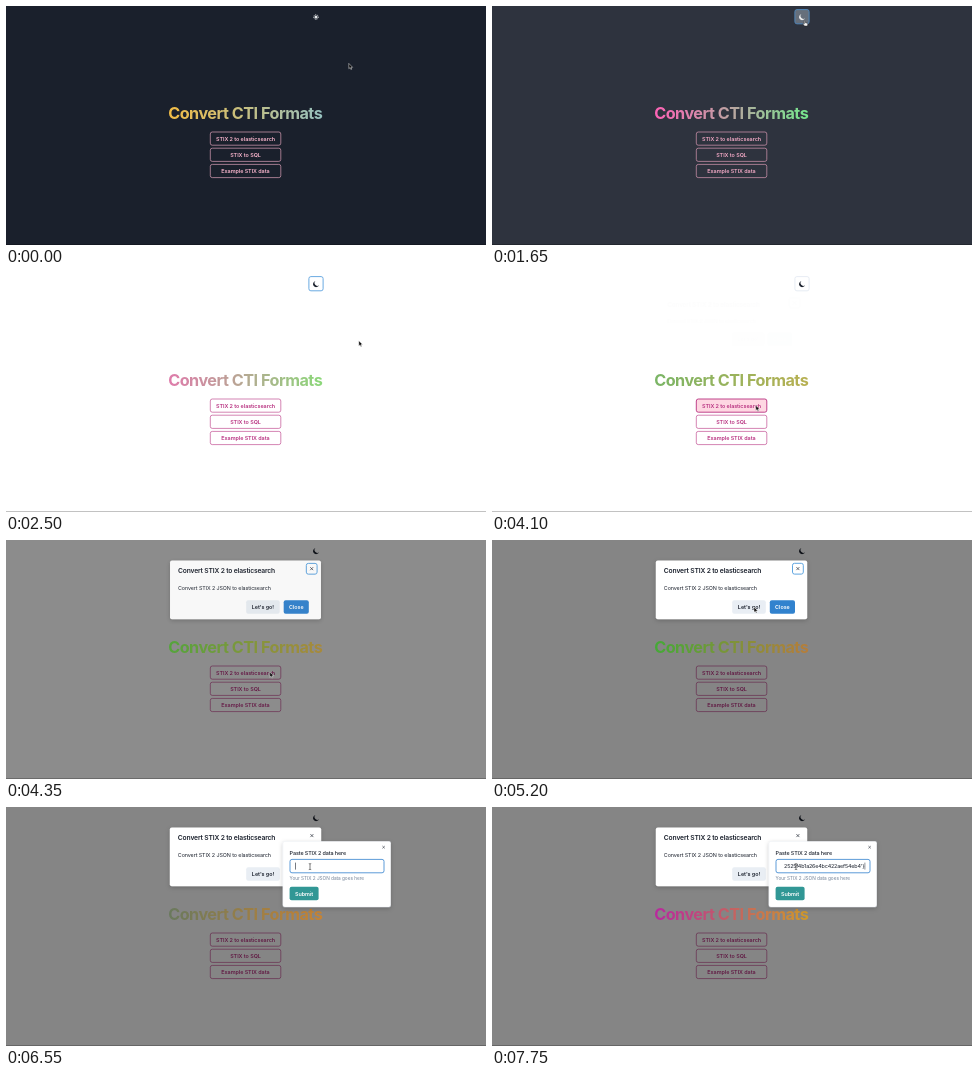
Recreate the animation shown at these times as an HTML page. Size 480 by 239 pixels, loop 8000 ms.

```html
<!DOCTYPE html>
<html lang="en">
<head>
<meta charset="utf-8">
<title>Convert CTI Formats</title>
<style>
  html, body { margin: 0; width: 100%; height: 100%; overflow: hidden; background: #1a202c; }
  svg { display: block; width: 100vw; height: 100vh; }
  text { font: 400 5.4px Inter, "Liberation Sans", sans-serif; letter-spacing: -.018em; white-space: pre; }
  .title { font-size: 16.2px; font-weight: 700; letter-spacing: -.03em; }
  .button { font-weight: 600; letter-spacing: -.006em; text-anchor: middle; }
  .heading { font-size: 6.75px; font-weight: 600; letter-spacing: -.025em; }
  .label { font-weight: 500; }
  .helper { font-size: 4.725px; letter-spacing: -.005em; }
  .data { text-anchor: end; letter-spacing: -.03em; }
</style>
</head>
<body>
<svg viewBox="0 0 480 239" preserveAspectRatio="none">
  <defs>
    <linearGradient id="titleFill" gradientUnits="userSpaceOnUse" x1="162" x2="317">
      <stop id="leftStop"/><stop id="rightStop" offset="1"/>
    </linearGradient>
    <filter id="shadow" x="-20%" y="-20%" width="140%" height="150%">
      <feDropShadow dx="0" dy="1.5" stdDeviation="2" flood-opacity=".2"/>
    </filter>
    <clipPath id="inputClip"><rect x="288.8" y="53" width="84.8" height="12"/></clipPath>
  </defs>

  <rect id="page" width="480" height="239"/>
  <rect y="238" width="480" height="1" fill="#000" opacity=".24"/>
  <rect id="toggle" x="302.9" y="3.6" width="14.2" height="14.2" rx="2"/>
  <g id="sun" fill="#e8eaed" stroke="#e8eaed">
    <circle cx="310" cy="11" r="1.5" stroke="none"/>
    <circle cx="310" cy="11" r="2.3" fill="none" stroke-width="1" stroke-dasharray=".9 .906"/>
  </g>
  <path id="moon" d="M309.6 8a3.1 3.1 0 1 0 3.4 4.2a2.7 2.7 0 0 1-3.4-4.2Z"/>
  <g id="menu"></g>
  <rect id="overlay" width="480" height="239"/>
  <text class="title" x="239.2" y="112.8" text-anchor="middle" fill="url(#titleFill)">Convert CTI Formats</text>

  <g id="modal">
    <rect x="163.8" y="20.4" width="151.4" height="58.9" rx="2" fill="#fff" filter="url(#shadow)"/>
    <g fill="#1a202c">
      <text class="heading" x="171.8" y="33.4">Convert STIX 2 to elasticsearch</text>
      <text x="171.8" y="50.1">Convert STIX 2 JSON to elasticsearch</text>
    </g>
    <rect id="closeRing" x="300.5" y="23.3" width="10.8" height="10.8" rx="2" fill="none" stroke="#5fa5e0"/>
    <path d="M304.4 27.1l3 3m0-3l-3 3" stroke="#1a202c" stroke-width=".65"/>
    <rect id="go" x="240.2" y="60.3" width="33.6" height="13.5" rx="2"/>
    <text class="button" x="257" y="69" fill="#1a202c">Let's go!</text>
    <rect id="closeButton" x="277.8" y="60.3" width="25.2" height="13.5" rx="2" fill="#3182ce"/>
    <text class="button" x="290.4" y="69" fill="#fff">Close</text>
  </g>

  <g id="popover">
    <rect x="276.8" y="34.3" width="108" height="65.8" rx="2" fill="#fff" stroke="#dde3ea" stroke-width=".35" filter="url(#shadow)"/>
    <rect id="popRing" x="373.5" y="36.2" width="8.1" height="8.1" rx="1.4" fill="none" stroke="#5fa5e0"/>
    <path d="M376.4 39l2.4 2.4m0-2.4l-2.4 2.4" stroke="#1a202c" stroke-width=".55"/>
    <text class="label" x="283.6" y="47.6" fill="#1a202c">Paste STIX 2 data here</text>
    <rect id="input" x="284" y="52.4" width="94" height="13.4" rx="2" fill="#fff"/>
    <g clip-path="url(#inputClip)">
      <text id="data" class="data" x="372.3" y="61.1" fill="#1a202c">2525f4b1a26e4bc422aef54eb4'}</text>
      <rect id="caret" y="55.6" width=".6" height="7" fill="#1a202c"/>
    </g>
    <text class="helper" x="283.6" y="73.4" fill="#718096">Your STIX 2 JSON data goes here</text>
    <rect x="283.6" y="79.8" width="29" height="13.5" rx="2" fill="#319795"/>
    <text class="button" x="298.1" y="88.5" fill="#fff">Submit</text>
  </g>

  <g id="cursor">
    <path id="arrow" d="M0 0v5.3l1.25-1.1l.85 1.9l.9-.4l-.85-1.8h1.65Z" fill="#0a0a0a" stroke="#fff" stroke-width=".45"/>
    <path id="hand" d="M-.5.4q.5-.8 1 0v1.9l2 .5q.6.3.5.9l-.4 1.9h-2.9l-1.7-2.2q0-.8.8-.4l.7.5Z" fill="#f4f4f4" stroke="#222" stroke-width=".45"/>
    <path id="beam" d="M-1.2-3q1.2 0 1.2.6q0-.6 1.2-.6M0-2.4v4.8M-1.2 3q1.2 0 1.2-.6q0 .6 1.2.6" fill="none" stroke="#222" stroke-width=".6"/>
  </g>
</svg>

<script>
const LOOP = 8000;
const SVG = 'http://www.w3.org/2000/svg';
const $ = id => document.getElementById(id);
const set = (el, attrs) => { for (const k in attrs) el.setAttribute(k, attrs[k]); };
const show = (id, on) => set($(id), { visibility: on ? 'inherit' : 'hidden' });
const within = (t, a, b) => t >= a && t < b;
const clamp = v => Math.min(1, Math.max(0, v));
const lerp = (a, b, k) => a + (b - a) * k;
const smooth = k => k * k * (3 - 2 * k);
const rgb = hex => [1, 3, 5].map(i => parseInt(hex.slice(i, i + 2), 16));
const mix = (a, b, k) => `rgb(${rgb(a).map((v, i) => Math.round(lerp(v, rgb(b)[i], k)))})`;

// The CSS "ease" timing curve.
function ease(x) {
  let lo = 0, hi = 1;
  for (let i = 0; i < 16; i++) {
    const s = (lo + hi) / 2;
    const at = .75 * s * (1 - s) ** 2 + .75 * s * s * (1 - s) + s ** 3;
    if (at < x) lo = s; else hi = s;
  }
  return .3 * lo * (1 - lo) ** 2 + 3 * lo * lo * (1 - lo) + lo ** 3;
}

function segment(keys, t) {
  let i = 0;
  while (i < keys.length - 2 && t >= keys[i + 1][0]) i++;
  const a = keys[i], b = keys[i + 1];
  return [a, b, clamp((t - a[0]) / (b[0] - a[0]))];
}

const cursorPath = [
  [100, 342.8, 57.4], [900, 313, 15], [1300, 312.8, 14.4], [2300, 312.8, 14.4],
  [2480, 353, 66], [2650, 348.5, 106], [2780, 348.5, 106], [3350, 283.5, 124],
  [3500, 283.5, 124], [3750, 263.8, 132.3], [4330, 263.8, 132.3], [4750, 261.5, 82.5],
  [4900, 261.5, 82.5], [5200, 262, 67], [5850, 262, 67], [6250, 304, 59.6]
];

const titleColors = [
  [0, '#f2bc45', '#96c1c0'], [1650, '#ff62b6', '#74e88c'], [2200, '#f270b8', '#82e080'],
  [4100, '#7ab566', '#b8b052'], [4350, '#54a43c', '#a8893c'],
  [5800, '#38ac34', '#c0743a'], [7750, '#b8289f', '#d09a28']
];

const opening = [[4100, 0], [4150, .15], [4330, .15], [4350, .94], [4550, 1]];

const buttons = ['STIX 2 to elasticsearch', 'STIX to SQL', 'Example STIX data'].map((label, i) => {
  const y = 126 + i * 16.2;
  const box = document.createElementNS(SVG, 'rect');
  const text = document.createElementNS(SVG, 'text');
  set(box, { x: 204.3, y, width: 70.5, height: 13.2, rx: 2, 'stroke-width': .6 });
  set(text, { class: 'button', x: 239.5, y: y + 8.6 });
  text.textContent = label;
  $('menu').append(box, text);
  return { box, text };
});

const scaleAbout = (x, y, s) => `translate(${x} ${y}) scale(${s}) translate(${-x} ${-y})`;

function drawPage(t) {
  const light = ease(clamp((t - 1632) / 200));
  const ink = mix('#fbb6ce', '#b83280', light);
  set($('page'), { fill: mix('#1a202c', '#ffffff', light) });
  buttons.forEach(({ box, text }, i) => {
    const pressed = i === 0 && within(t, 3900, 4150);
    const hovered = i === 0 && within(t, 3700, 3900);
    set(box, {
      stroke: ink,
      fill: pressed ? '#fed7e2' : hovered ? '#fff5f7' : 'none',
      'stroke-width': pressed ? .9 : .6
    });
    set(text, { fill: ink });
  });

  const focused = within(t, 1500, 3900);
  const active = within(t, 1450, 2350);
  set($('toggle'), {
    fill: active ? mix('#59636f', '#edf2f7', light) : 'none',
    stroke: focused ? mix('#4d83b5', '#6aaae2', light) : within(t, 3900, 4150) ? '#e1e7f0' : 'none',
    'stroke-width': focused ? 1 : .8
  });
  show('sun', t < 1600);
  show('moon', t >= 1600);
  set($('moon'), { fill: mix('#ffffff', '#1a202c', light) });

  const [a, b, k] = segment(titleColors, t);
  set($('leftStop'), { 'stop-color': mix(a[1], b[1], k) });
  set($('rightStop'), { 'stop-color': mix(a[2], b[2], k) });
}

function drawDialogs(t) {
  const [a, b, k] = segment(opening, t);
  const open = lerp(a[1], b[1], k);
  set($('overlay'), { opacity: .48 * open });
  set($('modal'), { opacity: open, transform: scaleAbout(239.5, 49.8, .95 + .05 * open) });
  show('closeRing', t < 5500);
  set($('go'), { fill: within(t, 5500, 6000) ? '#d5dfe9' : '#e9eef4' });

  const pop = ease(clamp((t - 5700) / 190));
  set($('popover'), { opacity: pop, transform: scaleAbout(330.8, 67.2, .95 + .05 * pop) });
  show('closeButton', true);
  show('popRing', within(t, 5850, 6450));
  const typing = t >= 6500;
  set($('input'), { stroke: typing ? '#4a90d4' : '#e2e8f0', 'stroke-width': typing ? .9 : .4 });
  show('data', t >= 7000);
  show('caret', within(t, 6550, 7000) || t >= 7500);
  set($('caret'), { x: t < 7000 ? 289.3 : 372.7 });
}

function drawCursor(t) {
  const [a, b, k] = segment(cursorPath, t);
  const x = lerp(a[1], b[1], smooth(k)), y = lerp(a[2], b[2], smooth(k));
  set($('cursor'), { transform: `translate(${x} ${y})` });
  const hand = within(t, 1300, 2350) || within(t, 5450, 6000);
  show('hand', hand);
  show('beam', t >= 6000);
  show('arrow', !hand && t < 6000);
}

function draw(t) {
  drawPage(t);
  drawDialogs(t);
  drawCursor(t);
}

const start = performance.now();
function tick() {
  draw((performance.now() - start) % LOOP);
  requestAnimationFrame(tick);
}
draw(0);
requestAnimationFrame(tick);
</script>
</body>
</html>
```
